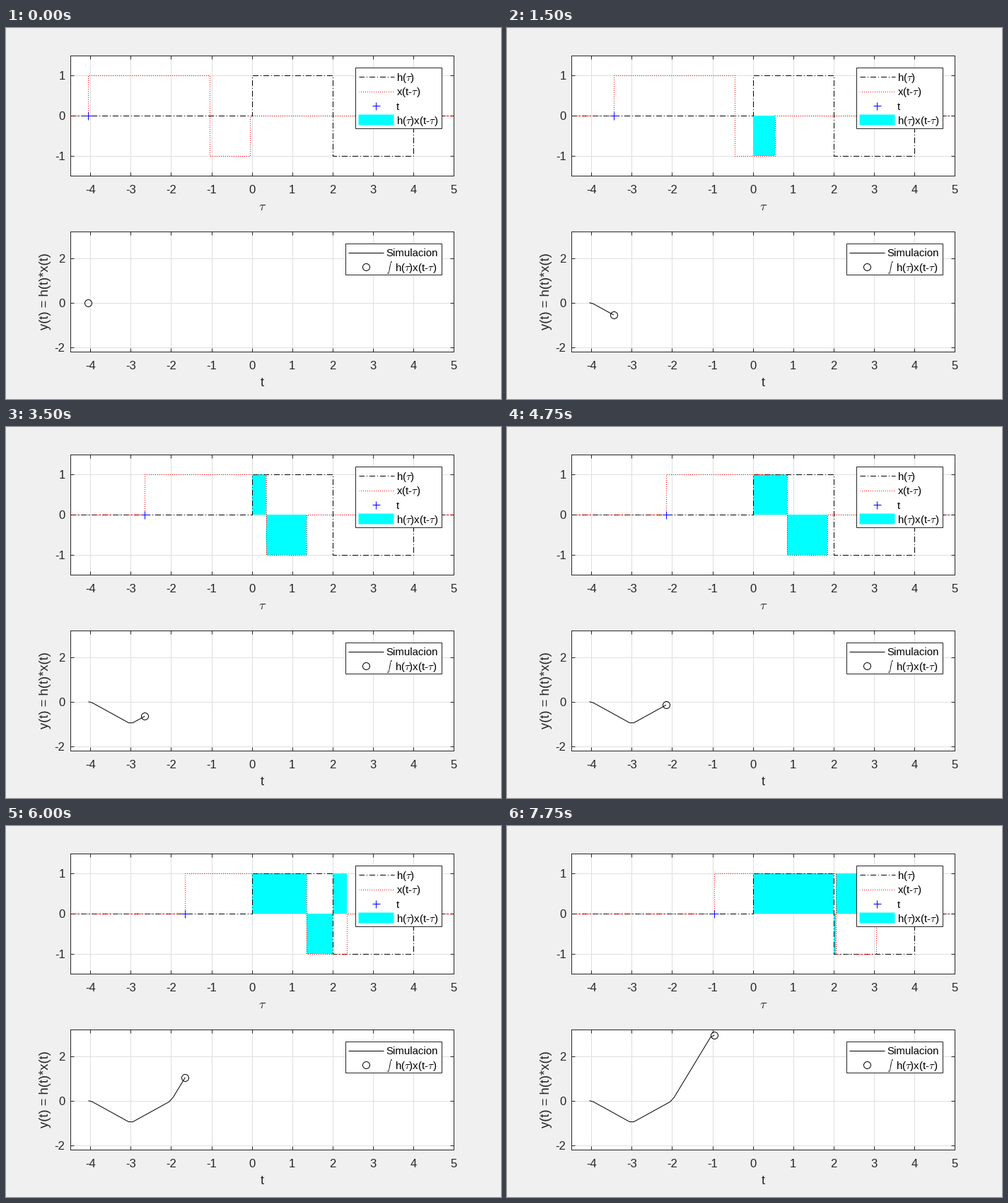
Write a matplotlib script that moves like this. It is 700 px wide and 525 px high and loops after 8 s.

```python
import numpy as np
import matplotlib.pyplot as plt
from matplotlib.animation import FuncAnimation
from matplotlib.collections import PolyCollection
from matplotlib.patches import Rectangle

W, H, DPI = 700, 525, 100
PX = 72 / DPI                      # one pixel in points
FRAMES, INTERVAL = 32, 250
T0, DT = -4.05, 0.1
INK = "#262626"
DASHDOT = (0.5, (8, 3, 1, 3))
DOTTED = (0.5, (1, 2))
LEFT, RIGHT = 90.8, 633
XLIM = (-4.5, 5)

plt.rcParams.update({"font.family": "Liberation Sans", "mathtext.fontset": "cm"})
fig = plt.figure(figsize=(W / DPI, H / DPI), dpi=DPI, facecolor="#f0f0f0")

# Overlay measured in pixels from the top left, for text and legends
over = fig.add_axes([0, 0, 1, 1], zorder=5)
over.set(xlim=(0, W), ylim=(H, 0))
over.axis("off")


def label(x, y, s, size, color=INK, ha="left", va="baseline", **kw):
    over.text(x, y, s, fontsize=size * PX, color=color, ha=ha, va=va, **kw)


def plot_area(top, bottom, ylim, yticks):
    ax = fig.add_axes([LEFT / W, 1 - bottom / H,
                       (RIGHT - LEFT) / W, (bottom - top) / H])
    ax.set(xlim=XLIM, ylim=ylim, xticks=range(-4, 6), yticks=yticks)
    ax.set_axisbelow(True)
    ax.grid(color="#dfdfdf", linewidth=PX)
    ax.tick_params(direction="in", length=5.4 * PX, width=PX, color=INK,
                   top=True, right=True, labelbottom=False, labelleft=False)
    for spine in ax.spines.values():
        spine.set(linewidth=PX, color=INK)
    scale = (RIGHT - LEFT) / (XLIM[1] - XLIM[0])
    for v in range(-4, 6):
        label(LEFT + (v - XLIM[0]) * scale, bottom + 25, str(v),
              16.67, ha="center")
    for v in yticks:
        y = bottom - (v - ylim[0]) * (bottom - top) / (ylim[1] - ylim[0])
        label(83.5, y + 6, str(v), 16.67, ha="right")
    return ax


def legend_box(x0, y0, x1, y1):
    over.add_patch(Rectangle((x0, y0), x1 - x0, y1 - y0, facecolor="white",
                             edgecolor=INK, linewidth=PX))


def stroke(ax, xs, ys, color="black", style="-", **kw):
    return ax.plot(xs, ys, color=color, linestyle=style, linewidth=PX,
                   dash_capstyle="butt", solid_capstyle="butt", **kw)[0]


def mark(ax, x, y, shape, color="black", size=10):
    return ax.plot([x], [y], shape, markersize=size * PX, markeredgewidth=PX,
                   markeredgecolor=color, markerfacecolor="none", zorder=4)[0]


def h(s):
    return np.where((s > 0) & (s < 2), 1, 0) - np.where((s > 2) & (s < 4), 1, 0)


def x_flipped(s, t):
    u = s - t
    return np.where((u > 0) & (u < 3), 1, 0) - np.where((u > 3) & (u < 4), 1, 0)


def product(t):
    """Piecewise constant h * x: edges and the value between them."""
    edges = np.sort([0, 2, 4, t, t + 3, t + 4])
    mid = (edges[:-1] + edges[1:]) / 2
    return edges, h(mid) * x_flipped(mid, t)


def integral(t):
    edges, values = product(t)
    return np.sum(np.diff(edges) * values)


times = T0 + DT * np.arange(FRAMES)
output = np.array([integral(t) for t in times])

# Signals
ax1 = plot_area(39, 209, (-1.5, 1.5), [-1, 0, 1])
area = PolyCollection([], facecolor="cyan", linewidth=0, antialiased=False,
                      zorder=1)
ax1.add_collection(area, autolim=False)
stroke(ax1, [-4.5, 0, 0, 2, 2, 4, 4, 5], [0, 0, 1, 1, -1, -1, 0, 0],
       style=DASHDOT, zorder=2)
x_line = stroke(ax1, [], [], "red", DOTTED, zorder=3)
cursor = mark(ax1, T0, 0, "+", "blue", 11)
label(362.5, 258, r"$\tau$", 18.33, ha="center")

# Convolution
ax2 = plot_area(288, 458, (-2.2, 3.2), [-2, 0, 2])
curve = stroke(ax2, [], [], zorder=3)
head = mark(ax2, T0, 0, "o")
label(362.5, 507, "t", 18.33, ha="center")
label(55, 373, "y(t) = h(t)*x(t)", 18.33, ha="center", va="center",
      rotation=90)

# Legends
legend_box(494, 56, 616, 142)
stroke(over, [499, 549], [69, 69], style=DASHDOT)
stroke(over, [499, 549], [90, 90], "red", DOTTED)
mark(over, 523, 110, "+", "blue", 11)
over.add_patch(Rectangle((498.5, 122.5), 50, 15, facecolor="cyan",
                         linewidth=0, snap=False))
for y, s in ((74.5, r"h($\tau$)"), (95, r"x(t-$\tau$)"), (115.5, "t"),
             (136, r"h($\tau$)x(t-$\tau$)")):
    label(551.5, y, s, 15, "black")

legend_box(480, 305, 616, 349)
stroke(over, [484, 534], [318, 318])
mark(over, 509, 338, "o")
label(537.5, 323, "Simulacion", 15, "black")
label(542, 338.5, r"$\int$", 7.2, "black", ha="center", va="center")
label(549.5, 344, r"h($\tau$)x(t-$\tau$)", 15, "black")


def update(i):
    t = times[i]
    edges, values = product(t)
    area.set_verts([[(a, 0), (a, v), (b, v), (b, 0)]
                    for a, b, v in zip(edges[:-1], edges[1:], values) if v])
    x_line.set_data([-4.5, t, t, t + 3, t + 3, t + 4, t + 4, 5],
                    [0, 0, 1, 1, -1, -1, 0, 0])
    cursor.set_data([t], [0])
    curve.set_data(times[:i + 1], output[:i + 1])
    head.set_data([t], [output[i]])
    return area, x_line, cursor, curve, head


anim = FuncAnimation(fig, update, frames=FRAMES, interval=INTERVAL,
                     repeat=True, repeat_delay=0, blit=False)
plt.show()
```
